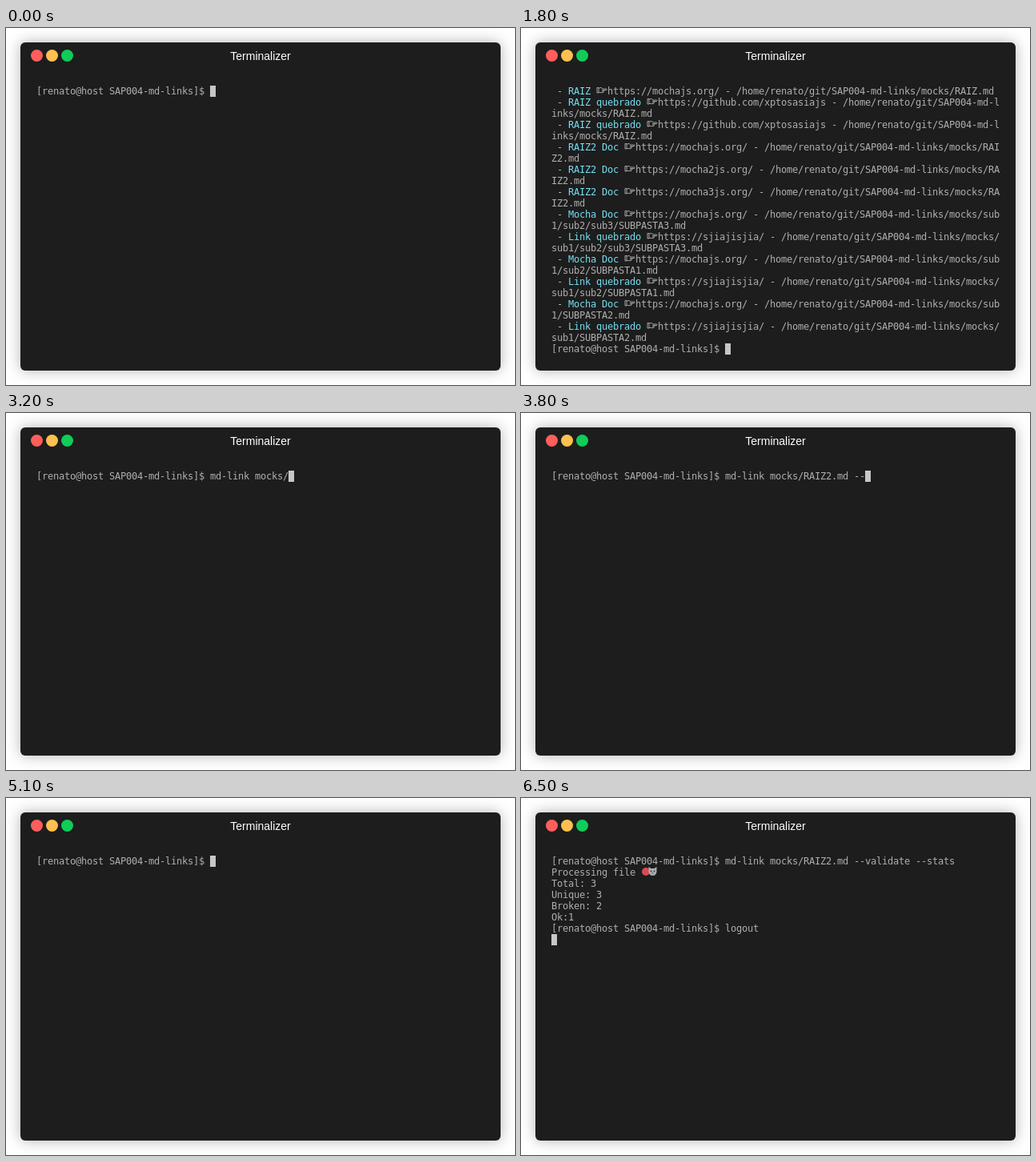
These frames come from a looping animation (636x446 px, 6.6 s). An HTML page with a canvas:

```html
<!DOCTYPE html>
<html lang="en">
<head>
<meta charset="utf-8">
<title>Terminal</title>
<style>
html, body { margin: 0; width: 100%; height: 100%; overflow: hidden; background: #fff; }
#win {
  position: absolute; left: 18px; top: 18px; width: 600px; height: 410px;
  border-radius: 6px; background: #1d1d1d; box-shadow: 0 0 18px rgba(0, 0, 0, .3);
}
#title {
  position: absolute; left: 0; right: 0; top: 9px; text-align: center;
  font: 14px/16px "Liberation Sans", Arial, sans-serif; color: #fff;
}
#win i { position: absolute; top: 9px; width: 15px; height: 15px; border-radius: 50%; }
canvas { position: absolute; left: 0; top: 0; }
</style>
</head>
<body>
<div id="win">
  <i style="left:13px;background:#ff5f5c"></i>
  <i style="left:32px;background:#ffc04f"></i>
  <i style="left:51px;background:#10cc59"></i>
  <div id="title">Terminalizer</div>
</div>
<canvas id="term" width="636" height="446"></canvas>
<script>
const STEP = 100, COLS = 80, ROWS = 24, CW = 7, CH = 14, LEFT = 38, TOP = 72;
const TEXT = "#afafaf", LINK = "#75dff2", CURSOR = "#c7c7c7";
const HOME = "/home/renato/git/SAP004-md-links/mocks/";
const PROMPT = "[renato@host SAP004-md-links]$ ";
const ctx = document.getElementById("term").getContext("2d");

// « and » switch the link colour on and off; ☞ and ☺ are drawn icons
const link = (label, url, file) => ` - «${label}» ☞https://${url} - ${HOME}${file}.md\n`;
const root = link("RAIZ", "mochajs.org/", "RAIZ");
const broken = link("RAIZ quebrado", "github.com/xptosasiajs", "RAIZ");
const second = ["mochajs", "mocha2js", "mocha3js"]
  .map(site => link("RAIZ2 Doc", site + ".org/", "RAIZ2")).join("");
const nested = ["sub1/sub2/sub3/SUBPASTA3", "sub1/sub2/SUBPASTA1", "sub1/SUBPASTA2"]
  .map(file => link("Mocha Doc", "mochajs.org/", file) +
               link("Link quebrado", "sjiajisjia/", file)).join("");

// Each entry is the terminal's content during one step
const screens = [];
let screen = "";
const put = s => screens.push(screen += s);
const type = s => [...s].forEach(put);
const clear = () => screens.push(screen = PROMPT);
const run = output => ["\n", "Processing file ☺\n", output, PROMPT].forEach(put);

clear();
type("md-link mocks/");
run(root + broken + broken + second + nested);
clear();
type("md-link mock");
["s/", "R", "AIZ", "2", ".md "].forEach(put);
type("--validate");
run(second);
clear();
put("md-link mocks/RAIZ2.md --validate");
type(" --stats");
run("Total: 3\nUnique: 3\nBroken: 2\nOk:1\n");
put("logout\n");

const handPath = new Path2D(
  "M1 2.5h2v6.5h-2zM3 3.2L6 2.4L8 4H12.6q1.2 .8 0 1.6H7" +
  "M9.6 5.6q.7 .8-.2 1.4H7.2M9 7q.5 .8-.4 1.6H5L3 8.2");
const catPath = new Path2D("M9.5 0l3 2h4l3-2v6.5q-1 4.5-5 4.5t-5-4.5z");

function icon(ch, x, y) {
  ctx.save();
  ctx.translate(x, y);
  if (ch === "☞") {
    ctx.strokeStyle = TEXT;
    ctx.lineWidth = .9;
    ctx.stroke(handPath);
  } else {
    const dot = (color, cx, cy, r) => {
      ctx.fillStyle = color;
      ctx.beginPath();
      ctx.arc(cx, cy, r, 0, 7);
      ctx.fill();
    };
    dot("#d94a58", 6, 6, 5);
    ctx.fillStyle = "#a9adad";
    ctx.fill(catPath);
    dot("#333", 12.5, 5.5, .9);
    dot("#333", 16.5, 5.5, .9);
    dot("#555", 14.5, 8, .8);
  }
  ctx.restore();
}

function layout(text) {
  const cells = [];
  let col = 0, row = 0, color = TEXT;
  for (const ch of text) {
    if (ch === "«") color = LINK;
    else if (ch === "»") color = TEXT;
    else if (ch === "\n") { col = 0; row++; }
    else {
      const width = "☞☺".includes(ch) ? 2 : 1;
      if (col + width > COLS) { col = 0; row++; }
      cells.push({ ch, col, row, color, width });
      col += width;
    }
  }
  return { cells, col, row };
}

function draw(text) {
  const { cells, col, row } = layout(text);
  const scroll = Math.max(0, row - ROWS + 1);
  const px = c => LEFT + c * CW, py = r => TOP + (r - scroll) * CH;
  ctx.clearRect(0, 0, 636, 446);
  ctx.font = '12px "DejaVu Sans Mono", monospace';
  for (const c of cells) {
    if (c.row < scroll) continue;
    if (c.width === 2) icon(c.ch, px(c.col), py(c.row));
    else {
      ctx.fillStyle = c.color;
      ctx.fillText(c.ch, px(c.col), py(c.row) + 11);
    }
  }
  ctx.fillStyle = CURSOR;
  ctx.fillRect(px(col), py(row), CW, CH);
}

const start = performance.now();
function tick() {
  const t = performance.now() - start;
  draw(screens[Math.floor(t / STEP) % screens.length]);
  requestAnimationFrame(tick);
}
tick();
</script>
</body>
</html>
```
